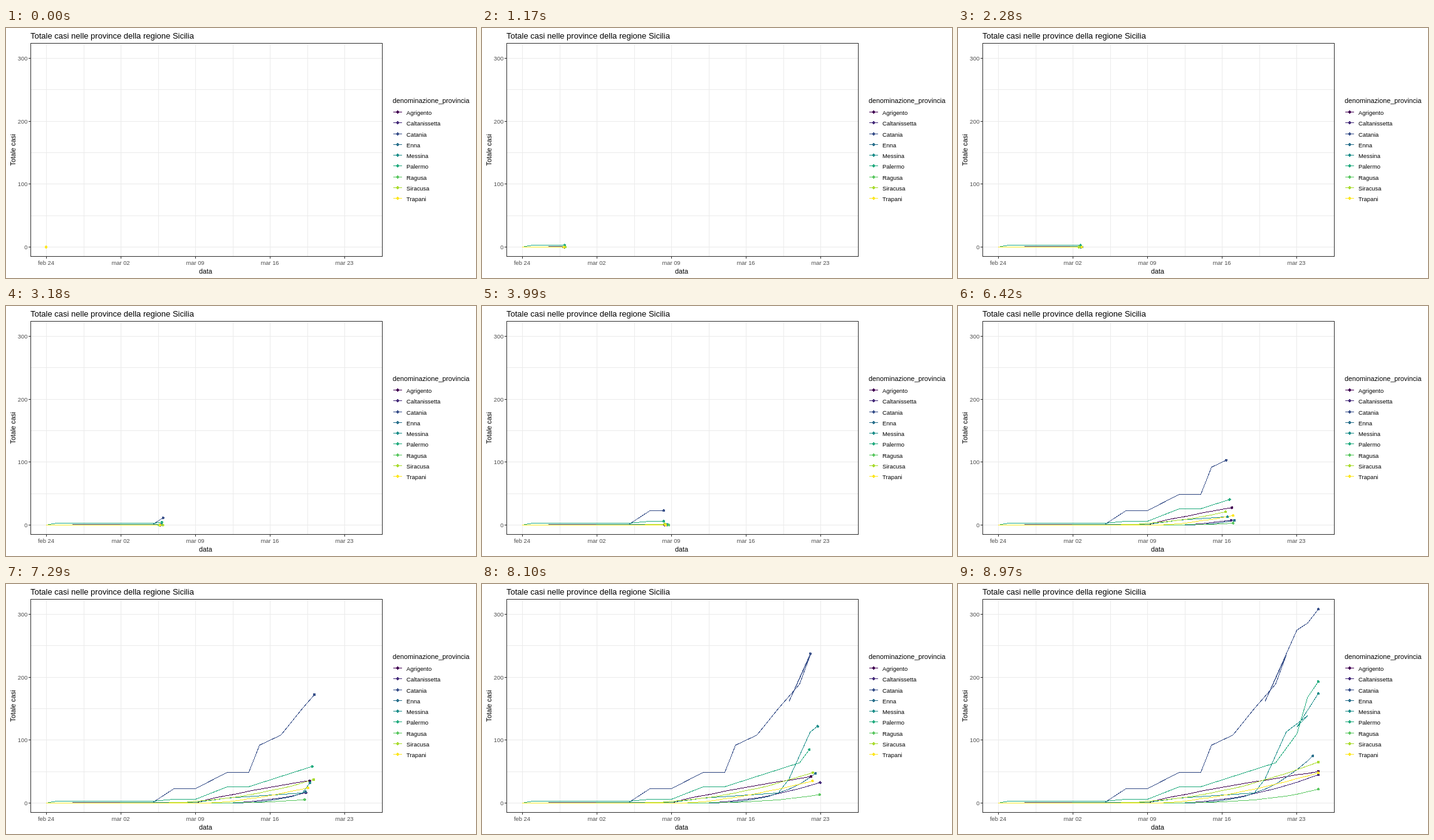
An HTML page that plays this animation: 750 px wide and 400 px high, repeating every 9 s.

```html
<!DOCTYPE html>
<html lang="it">
<head>
<meta charset="utf-8">
<style>
html, body { margin: 0; width: 100%; height: 100%; overflow: hidden; background: #fff; }
svg { display: block; font-family: "Liberation Sans", Arial, sans-serif; }
polyline, path, circle, rect { shape-rendering: crispEdges; }
.title { font-size: 13px; }
.axis { font-size: 10.8px; }
.label { font-size: 9.4px; }
.tick { font-size: 9.4px; fill: #4d4d4d; }
</style>
</head>
<body>
<svg id="chart" width="750" height="400" viewBox="0 0 750 400"></svg>
<script>
const chart = document.getElementById('chart');
const STEP = 30, STEPS = 300, LAST_DAY = 30;
const X0 = 64, DAY = 17.03, Y0 = 350.5, UNIT = 1.0067;

// Daily cases that rise from zero on the first day to a total on the last
function growth(first, total, power, last = LAST_DAY) {
  const points = [[0, 0], [first, 0]];
  for (let d = first + 1; d < last + 1; d++) {
    const day = Math.min(d, last);
    points.push([day, Math.round(total * ((day - first) / (last - first)) ** power)]);
  }
  return points;
}

// [day, cases] points; a step back in days is a doubled stretch of line
const series = [
  ['Agrigento', '#440154', growth(14, 50, .85)],
  ['Caltanissetta', '#472D7B', growth(16, 45, 2)],
  ['Catania', '#3B528B', [[0, 0], [2, 0], [3, 1], [10, 1], [12, 23], [14, 23], [17, 49], [19, 49], [20, 92],
    [22, 108], [24, 150], [26, 189], [27, 235], [25, 161], [28, 275], [29, 286], [30, 308]]],
  ['Enna', '#2C728E', growth(16, 75, 3, 29.5)],
  ['Messina', '#21908C', [[0, 0], [14, 1], [17, 8], [24, 16], [25, 38], [27, 113], [29, 139], [28, 121], [30, 174]]],
  ['Palermo', '#27AD81', [[0, 0], [1, 3], [10, 3], [12, 6], [14, 6], [17, 26], [19, 26], [26, 64],
    [28, 110], [29, 168], [30, 193]]],
  ['Ragusa', '#5DC863', growth(10, 22, 4)],
  ['Siracusa', '#AADC32', growth(10, 65, 2)],
  ['Trapani', '#FDE725', growth(15, 48, 1.5)]
];

function add(tag, attrs, text) {
  const node = document.createElementNS('http://www.w3.org/2000/svg', tag);
  for (const key in attrs) node.setAttribute(key, attrs[key]);
  if (text) node.textContent = text;
  return chart.appendChild(node);
}
const stroke = (d, colour) => add('path', { d, stroke: colour, fill: 'none' });
const write = (x, y, text, cls, anchor = 'start') =>
  add('text', { x, y, class: cls, 'text-anchor': anchor }, text);
const snap = v => Math.floor(v) + .5;

// Grid, ticks and axis labels
['feb 24', 'mar 02', 'mar 09', 'mar 16', 'mar 23'].forEach((name, i) => {
  const x = snap(X0 + i * 7 * DAY);
  stroke(`M${x} 25V365` + (i < 4 ? `M${x + 60} 25V365` : ''), '#ebebeb');
  stroke(`M${x} 366v3`, '#333');
  write(x - .5, 379, name, 'tick', 'middle');
});
for (let i = 0; i < 4; i++) {
  const level = 350.4 - i * 100 * UNIT, y = snap(level);
  stroke(`M40 ${y}H600` + (i < 3 ? `M40 ${snap(level - 50 * UNIT)}H600` : ''), '#ebebeb');
  stroke(`M36 ${y}h3`, '#333');
  write(34.5, y + 3.5, String(i * 100), 'tick', 'end');
}

const lines = series.map(s => add('polyline', { fill: 'none', stroke: s[1] }));
const dots = series.map(s => add('circle', { r: 2.2, fill: s[1] }));

add('rect', { x: 39.5, y: 24.5, width: 561, height: 341, fill: 'none', stroke: '#333' });
write(39, 17, 'Totale casi nelle province della regione Sicilia', 'title');
write(318.5, 393, 'data', 'axis', 'middle');
write(0, 0, 'Totale casi', 'axis', 'middle').setAttribute('transform', 'translate(14.5 195) rotate(-90)');

// Legend
write(617, 120, 'denominazione_provincia', 'axis');
series.forEach(([name, colour], i) => {
  const y = snap(134.6 + i * 17.25);
  stroke(`M618 ${y}h14`, colour);
  add('circle', { cx: 625, cy: y, r: 2.2, fill: colour });
  write(639, y + 4, name, 'label');
});

// Each province runs a little ahead of or behind the clock until the last day
function dayOf(i, clock) {
  const drift = clock * (.012 + .019 * Math.sin(i * 2.4 + clock * .9));
  return Math.min(LAST_DAY, clock + drift * Math.min(1, LAST_DAY - clock));
}

// Pixel path of the data up to the given day, ending on an interpolated point
function reveal(data, day) {
  const next = data.findIndex(p => p[0] > day);
  const shown = next < 0 ? data.slice() : data.slice(0, next);
  if (next > 0) {
    const [d, v] = data[next - 1], [d2, v2] = data[next];
    shown.push([day, v + (v2 - v) * (day - d) / (d2 - d)]);
  }
  return shown.map(([d, v]) => [X0 + d * DAY, Y0 - v * UNIT]);
}

function draw(now) {
  const step = Math.floor(now / STEP) % STEPS;
  const clock = LAST_DAY * step / (STEPS - 1);
  series.forEach(([, , data], i) => {
    const points = reveal(data, dayOf(i, clock));
    const [x, y] = points[points.length - 1];
    lines[i].setAttribute('points', points.join(' '));
    dots[i].setAttribute('cx', x);
    dots[i].setAttribute('cy', y);
  });
}

const start = performance.now();
function tick() {
  draw(performance.now() - start);
  requestAnimationFrame(tick);
}
tick();
</script>
</body>
</html>
```
